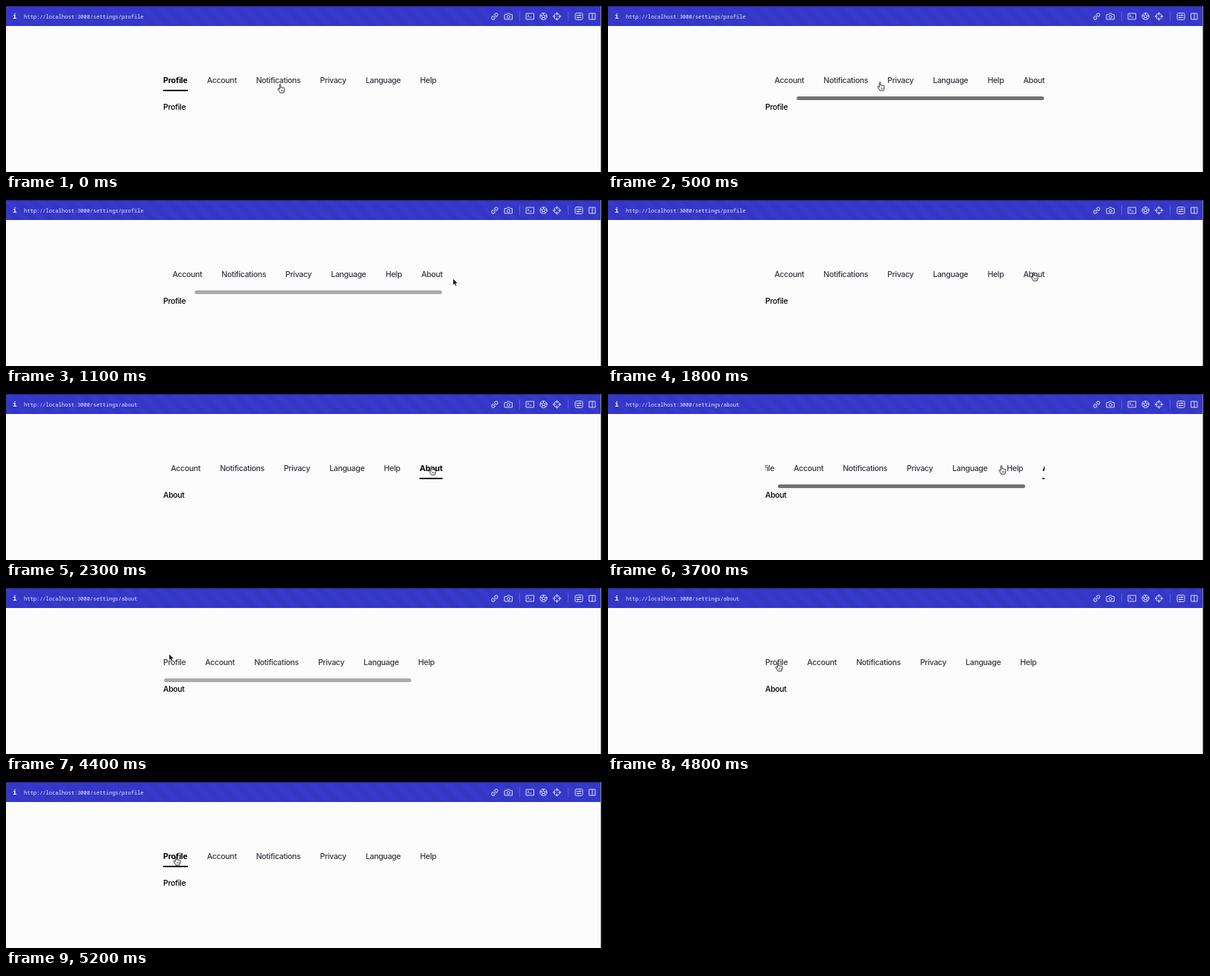
Recreate the animation shown at these times as an HTML page. Size 800 by 224 pixels, loop 6000 ms.

```html
<!DOCTYPE html>
<html lang="en">
<head>
<meta charset="utf-8">
<title>Settings tabs</title>
<style>
  html, body { margin: 0; width: 100%; height: 100%; overflow: hidden; }
  body { position: relative; background: #fcfcfd; font: 450 10.5px/14px Inter, "Open Sans", sans-serif; letter-spacing: -.31px; color: #000; }
  .abs, .bar, .cursor { position: absolute; white-space: pre; }
  .bar { left: 0; top: 0; width: 800px; height: 27px; border-top: 1px solid #23268a; box-sizing: border-box;
    background: repeating-linear-gradient(45deg, #3639cb 0 8px, #3337c4 8px 16px); }
  .edge { right: 0; top: 0; width: 1px; height: 224px; background: #000; border-left: 1px solid #8a8a90; }
  .url { left: 24px; top: 7px; font: 500 7.06px/14px "Noto Sans Mono", "DejaVu Sans Mono", monospace; letter-spacing: 0; color: #ecedff; }
  .info { left: 9px; top: 7px; font: bold 9px/14px "DejaVu Sans Mono", monospace; color: #fff; }
  .icons { left: 640px; top: 0; fill: none; stroke: #d8d9f7; stroke-width: 1; stroke-linecap: round; stroke-linejoin: round; }
  .view { left: 211px; top: 88px; width: 375px; height: 40px; overflow: hidden; }
  .strip { left: 0; top: 6px; display: flex; gap: 26px; width: max-content; }
  .tab { height: 21px; box-sizing: border-box; color: #35363e; }
  .tab.on { font-weight: 700; letter-spacing: -.1px; color: #000; border-bottom: 2px solid #111; }
  .thumb { left: 1px; top: 34.4px; height: 4.6px; border-radius: 3px; background: #000; }
  .panel { left: 211px; top: 130px; }
  .cursor { left: 0; top: 0; overflow: visible; }
</style>
</head>
<body>
<div class="bar"></div>
<div class="abs info">i</div>
<div class="abs url" id="url"></div>
<svg class="abs icons" width="160" height="26">
  <g transform="translate(16 14) rotate(-45)">
    <path d="M-1 -2H-3A2 2 0 0 0 -3 2H-1M1 -2H3A2 2 0 0 1 3 2H1M-2 0H2"/>
  </g>
  <path d="M29.5 11.5H32L33 10H36L37 11.5H39.5V18H29.5Z"/><circle cx="34.5" cy="14.5" r="1.9"/>
  <path d="M49.5 8V20M114.5 8V20" stroke="#5f63dc"/>
  <path d="M58.5 10H68.5V18H58.5ZM60.3 12L62 13.3L60.3 14.6M63 15H65"/>
  <circle cx="81.5" cy="14" r="4.6"/>
  <path d="M81.5 11.8L83.6 13.3L82.8 15.8H80.2L79.4 13.3ZM81.5 11.8V9.5M83.6 13.3L85.8 12.6M82.8 15.8L84.2 17.6M80.2 15.8L78.8 17.6M79.4 13.3L77.2 12.6"/>
  <circle cx="99.5" cy="14" r="4"/>
  <path d="M99.5 8.6V12M99.5 16V19.4M94.1 14H97.5M101.5 14H104.9"/>
  <rect x="124" y="9.5" width="10" height="9" rx="1.8"/>
  <path d="M126 12.5H132M126 15.5H132M130.3 11.5V13.5M127.7 14.5V16.5"/>
  <path d="M143 10H151V18H143ZM147 10V18"/>
</svg>
<div class="abs view">
  <div class="abs strip" id="strip"></div>
  <div class="abs thumb" id="thumb"></div>
</div>
<div class="abs panel" id="panel"></div>
<svg class="cursor" id="arrow" width="10" height="14">
  <path d="M0 0V9L2 7.2L3.4 10.2L5 9.5L3.7 6.6H6.4Z" fill="#000" stroke="#fff" stroke-width=".7"/>
</svg>
<svg class="cursor" id="hand" width="12" height="14">
  <g transform="translate(-.9 -1) scale(1.05)">
    <path d="M3 7.2L2.2 6.2C1.6 5.6 .6 6 .9 6.9L2.8 10C3.2 10.7 3.4 11 3.5 11.5H8.3C8.4 10.5 9.3 9.6 9.3 8V5.8C9.3 4.9 8.1 4.9 8 5.6C7.9 4.6 6.6 4.6 6.4 5.3C6.2 4.4 5 4.4 4.6 5V1.5C4.6 .3 3 .3 3 1.5Z" fill="#fff" stroke="#111" stroke-width=".8" stroke-linejoin="round"/>
    <path d="M5 7.5V9.8M6.3 7.5V9.8M7.6 7.5V9.8" stroke="#222" stroke-width=".5"/>
  </g>
</svg>
<div class="abs edge"></div>
<script>
  const $ = id => document.getElementById(id);
  const LOOP = 6000, STEP = 100, VIEW = 375;
  const names = ["Profile", "Account", "Notifications", "Privacy", "Language", "Help", "About"];
  const tabs = names.map(name => {
    const tab = document.createElement("div");
    tab.className = "tab";
    tab.textContent = name;
    $("strip").append(tab);
    return tab;
  });

  const ramp = (t, from, to) => Math.min(1, Math.max(0, (t - from) / (to - from)));
  const easeOut = p => 1 - (1 - p) ** 2;

  // The pointer rests between these moves.
  const home = { x: 365, y: 106 };
  const moves = [
    { from: 0, to: 200, x: 362, y: 103 },
    { from: 900, to: 1100, x: 600, y: 106 },
    { from: 1100, to: 1700, x: 568, y: 98 },
    { from: 2700, to: 3200, x: 525, y: 97 },
    { from: 3900, to: 4400, x: 219, y: 89 },
    { from: 4400, to: 4800, x: 225, y: 101 },
  ];
  const pointer = t => moves.reduce((pos, m) => {
    const p = ramp(t, m.from, m.to);
    return { x: pos.x + (m.x - pos.x) * p, y: pos.y + (m.y - pos.y) * p };
  }, home);

  // The scrollbar appears on scrolling, then fades.
  const flash = (t, show, hide) => ramp(t, show, show + 100) - ramp(t, hide, hide + 250);

  function draw(t) {
    const page = t >= 2100 && t < 5000 ? "About" : "Profile";
    $("url").textContent = "http://localhost:3000/settings/" + page.toLowerCase();
    $("panel").textContent = page;
    tabs.forEach((tab, i) => tab.classList.toggle("on", names[i] === page));

    const total = $("strip").getBoundingClientRect().width;
    const pos = ramp(t, 300, 500) - easeOut(ramp(t, 3580, 3900));
    const size = VIEW * VIEW / total;
    $("strip").style.transform = `translateX(${-pos * (total - VIEW)}px)`;
    $("thumb").style.width = size - 2 + "px";
    $("thumb").style.transform = `translateX(${pos * (VIEW - size)}px)`;
    $("thumb").style.opacity = .54 * (flash(t, 300, 1000) + flash(t, 3500, 4300));

    const { x, y } = pointer(t);
    const overTabs = x < 586 && y > 94;
    $("hand").style.display = overTabs ? "block" : "none";
    $("arrow").style.display = overTabs ? "none" : "block";
    $(overTabs ? "hand" : "arrow").style.transform = `translate(${x}px, ${y}px)`;
  }

  const start = performance.now();
  function tick() {
    const t = (performance.now() - start) % LOOP;
    draw(Math.floor(t / STEP) * STEP);
    requestAnimationFrame(tick);
  }
  tick();
</script>
</body>
</html>
```
